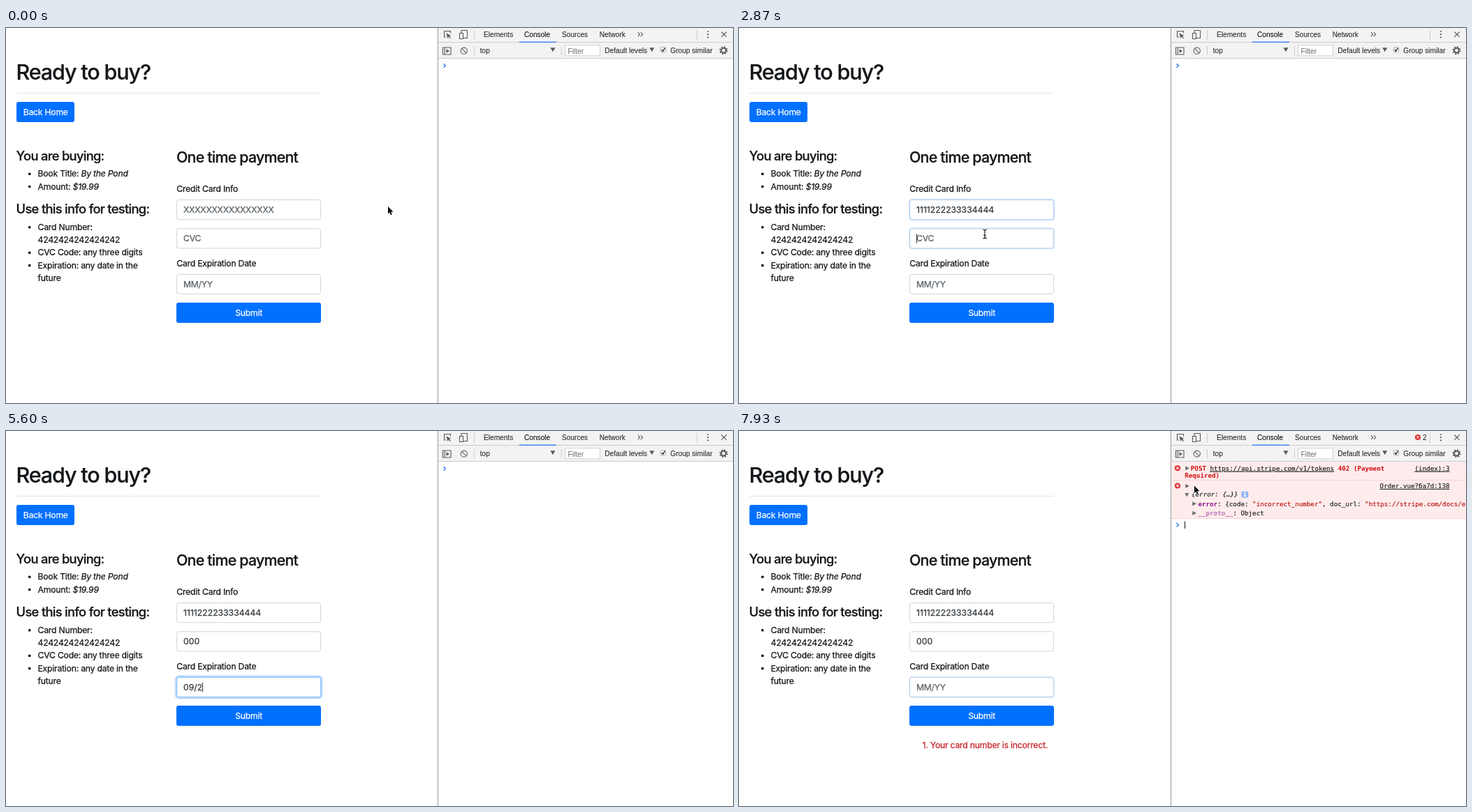
Write an HTML page that moves like this. It is 1041x538 px and loops after 8 s.

```html
<!DOCTYPE html>
<html lang="en">
<head>
<meta charset="utf-8">
<title>Payment form</title>
<style>
  html, body { margin: 0; width: 100%; height: 100%; overflow: hidden; background: #fff; }
  svg { display: block; width: 1041px; height: 538px; }
  text { white-space: pre; stroke-width: .25px; }
  text, tspan { fill: currentColor; stroke: currentColor; }
  .page { font: 12.2px Inter, "Open Sans", sans-serif; letter-spacing: -.0175em; color: #14171a; font-optical-sizing: none; }
  .h1, .h3, .h4 { font-weight: 500; letter-spacing: -.037em; }
  .h1 { font-size: 30.5px; }
  .h3 { font-size: 21.4px; }
  .h4 { font-size: 18.3px; }
  .btn { fill: #0070ff; }
  .white { color: #fff; }
  .mid { text-anchor: middle; }
  .value { color: #30363b; letter-spacing: 0; }
  .hint { color: #5a6268; }
  .alert { color: #c8232b; }
  .tools { font: 10.15px "Liberation Sans", Arial, sans-serif; color: #2c2c2c; }
  .tools text { stroke-width: .1px; }
  .log { font: 9.23px "DejaVu Sans Mono", monospace; color: #1a1a1a; }
  .log text { stroke-width: .15px; }
  .bold { font-weight: bold; stroke: none; }
  .red { color: #d40d12; }
  .link { text-decoration: underline; }
  .key { color: #881391; }
  .proto { color: #a458a8; }
  .str { color: #b9140f; }
  .icon { fill: none; stroke: #5a5a5a; stroke-width: 1.1; }
  .sep { stroke: #ccc; }
  .row { fill: #feecec; }
  .rule { stroke: #fbd3d3; }
</style>
</head>
<body>
<svg viewBox="0 0 1041 538" xmlns="http://www.w3.org/2000/svg">
  <defs>
    <path id="tri" d="M0-3.1L5.6 0L0 3.1z" fill="#6e6e6e"/>
    <path id="down" d="M-3.5-3H3.5L0 3z" fill="#5a5a5a"/>
    <path id="prompt" d="M-1.6-2.8L1.4 0L-1.6 2.8" fill="none" stroke="#367cf1" stroke-width="1.4"/>
    <g id="bad">
      <circle r="4.1" fill="#dc3236"/>
      <path d="M-1.6-1.6L1.6 1.6M1.6-1.6L-1.6 1.6" stroke="#fff" stroke-width="1.1"/>
    </g>
  </defs>

  <g class="page">
    <text class="h1" x="14.5" y="74">Ready to buy?</text>
    <path d="M15 93.6H451" stroke="#e3e3e3"/>
    <rect class="btn" x="15" y="106" width="83" height="29" rx="3"/>
    <text class="white mid" x="56.7" y="125.2">Back Home</text>

    <text class="h4" x="14.6" y="189.6">You are buying:</text>
    <text x="45.5" y="213.3">Book Title: <tspan font-style="italic">By the Pond</tspan></text>
    <text x="45.5" y="231.6">Amount: <tspan font-style="italic">$19.99</tspan></text>
    <text class="h4" x="14.6" y="266">Use this info for testing:</text>
    <text x="45.5" y="289.8">Card Number:</text>
    <text x="45.5" y="308.1">4242424242424242</text>
    <text x="45.5" y="326.4">CVC Code: any three digits</text>
    <text x="45.5" y="344.7">Expiration: any date in the</text>
    <text x="45.5" y="363">future</text>
    <g id="bullets" fill="#14171a"></g>

    <text class="h3" x="244" y="192.8">One time payment</text>
    <text x="244.3" y="235.3">Credit Card Info</text>
    <text x="244.3" y="342.3">Card Expiration Date</text>
    <g id="fields"></g>
    <g id="submit">
      <rect class="btn" x="244" y="394" width="207" height="29" rx="3"/>
      <text class="white mid" x="347.6" y="413.2">Submit</text>
    </g>
    <text id="alert" class="alert" x="262.5" y="455.4">1. Your card number is incorrect.</text>
  </g>

  <g class="tools">
    <rect x="618" width="423" height="538" fill="#fff"/>
    <rect x="618" width="423" height="43" fill="#f3f3f3"/>
    <path class="sep" d="M618 20.5H1041M618 43.5H1041M670.5 3V17M989.5 3V17M670.5 26V39M795.5 26V39"/>
    <path d="M618.5 0V538" stroke="#999"/>
    <path d="M735 20.25H788" stroke="#4285f4" stroke-width="1.5"/>

    <path class="icon" d="M630 13H627.5V4.5H636.5V7.5"/>
    <path d="M630.5 7.5L637.5 11L634.8 11.8L637 14.4L636 15.2L633.8 12.6L632.4 15z" fill="#5a5a5a"/>
    <path class="icon" d="M652 7V3.5H660.5V14.5H655M649.5 7.5H654.5V15.5H649.5z"/>
    <path class="icon" d="M905 6.2L907.6 9.2L905 12.2M909 6.2L911.6 9.2L909 12.2"/>
    <g fill="#5a5a5a"><circle cx="1005" cy="5" r="1.1"/><circle cx="1005" cy="9.2" r="1.1"/><circle cx="1005" cy="13.4" r="1.1"/></g>
    <path class="icon" d="M1024.3 5.5L1031.7 12.9M1031.7 5.5L1024.3 12.9"/>
    <text x="684" y="13">Elements</text>
    <text x="742" y="13" color="#111">Console</text>
    <text x="796" y="13">Sources</text>
    <text x="849.7" y="13">Network</text>

    <path class="icon" d="M625.5 28H637V38H625.5zM628.2 28V38"/>
    <path d="M630.5 30.2L635 33L630.5 35.8z" fill="#5a5a5a"/>
    <path class="icon" d="M652.6 29.4L659 35.8M651.2 32.7a4.6 4.6 0 1 0 9.2 0a4.6 4.6 0 1 0-9.2 0"/>
    <text x="678.7" y="36.2">top</text>
    <use href="#down" x="783" y="31.3"/>
    <rect x="800.5" y="24.8" width="50" height="15" fill="#fff" stroke="#d0d0d0"/>
    <text x="804.5" y="36.7" color="#777">Filter</text>
    <text x="857.3" y="36">Default levels</text>
    <use href="#down" x="924.8" y="31.3"/>
    <rect x="937.3" y="27.6" width="7.4" height="7.4" rx="1.4" fill="#fff" stroke="#a8a8a8" stroke-width=".9"/>
    <path d="M938.8 31.3L940.5 33.3L943.6 28.7" fill="none" stroke="#222" stroke-width="1.4"/>
    <text x="951.3" y="36">Group similar</text>
    <g fill="none" stroke="#5a5a5a" stroke-width="2">
      <circle cx="1027.5" cy="32.2" r="3.4"/>
      <circle cx="1027.5" cy="32.2" r="5" stroke-dasharray="1.9635"/>
    </g>
    <g id="badge"><use href="#bad" x="972" y="9"/><text id="count" x="979" y="13"></text></g>
  </g>

  <g class="log">
    <g id="errors">
      <rect class="row" x="619" y="44" width="422" height="26.5"/>
      <rect id="row" class="row" x="619" y="71" width="422"/>
      <path id="rules" class="rule"/>
      <use href="#bad" x="628" y="53.3"/>
      <use href="#bad" x="628" y="78.5"/>
      <use href="#tri" x="639.3" y="53.4"/>
      <text x="646.8" y="56.8"><tspan class="red bold">POST</tspan> <tspan class="link">https://api.stripe.com/v1/tokens</tspan> <tspan class="red bold">402 (Payment</tspan></text>
      <text class="red bold" x="638.2" y="67.3">Required)</text>
      <text class="link" x="1017.5" y="56.8" text-anchor="end">(index):3</text>
      <text class="link" x="1017.5" y="82" text-anchor="end">Order.vue?6a7d:138</text>
      <g id="shut">
        <use href="#tri" x="639.3" y="80.2"/>
        <use href="#tri" x="647.3" y="80.2"/>
        <text x="656" y="83.4" font-style="italic">{error: {…}}</text>
      </g>
      <g id="open">
        <use href="#tri" x="639.3" y="79"/>
        <path d="M638.2 89H644.4L641.3 94.6z" fill="#6e6e6e"/>
        <text x="648" y="94.4" font-style="italic">{error: {…}}</text>
        <rect x="719.3" y="86.4" width="10" height="9.4" rx="2" fill="#8fb6f3"/>
        <text class="white mid" x="724.3" y="94" font-size="8" font-weight="bold">i</text>
        <use href="#tri" x="649.3" y="104.3"/>
        <text x="657.4" y="107.7"><tspan class="key bold">error</tspan>: {code: <tspan class="str">"incorrect_number"</tspan>, doc_url: <tspan class="str">"https://stripe.com/docs/error-codes"</tspan></text>
        <use href="#tri" x="649.3" y="117.8"/>
        <text x="657.4" y="121.2"><tspan class="proto">__proto__</tspan>: Object</text>
      </g>
    </g>
    <use id="chevron" href="#prompt" x="628"/>
    <path id="typing" d="M638.5 129.5V140" stroke="#111"/>
  </g>

  <path id="arrow" d="M0 0V10.6L2.4 8.4L4 12.2L5.7 11.5L4.1 7.8H7.4z" stroke="#fff" stroke-width="1.4" paint-order="stroke"/>
  <g id="beam" fill="none">
    <path d="M0-5V5" stroke="#fff" stroke-width="2.4" opacity=".6"/>
    <path d="M-2.8-6.2Q0-6.2 0-4.6Q0-6.2 2.8-6.2M0-4.6V4.8M-2.8 6.4Q0 6.4 0 4.8Q0 6.4 2.8 6.4M-1.7 2H1.7" stroke="#111" stroke-width="1.1"/>
  </g>
</svg>

<script>
const LOOP = 8000, STEP = 1000 / 15, FADE = 150;
const $ = id => document.getElementById(id);
const show = (node, on) => node.setAttribute('visibility', on ? 'inherit' : 'hidden');
const set = (node, attrs) => { for (const k in attrs) node.setAttribute(k, attrs[k]); };
const add = (parent, tag, attrs) => {
  const node = document.createElementNS('http://www.w3.org/2000/svg', tag);
  set(node, attrs);
  return parent.appendChild(node);
};
const within = (t, [a, b]) => t >= a && t < b;
const ease = p => { p = Math.min(1, Math.max(0, p)); return p * p * (3 - 2 * p); };
const mix = (a, b, p) => a + (b - a) * p;

// typed: [time, value]; carets: spans in which the caret is lit
const fields = [
  { y: 246.6, hint: 'XXXXXXXXXXXXXXXX', focus: [1250, 2800],
    typed: [[2000, '1111222233334444']], carets: [[1270, 1730], [2000, 2530]] },
  { y: 287.8, hint: 'CVC', focus: [2800, 4450],
    typed: [[3530, '0'], [3800, '00'], [4000, '000']], carets: [[2800, 3330], [3530, 4470]] },
  { y: 353.4, hint: 'MM/YY', focus: [4450, 7850],
    typed: [[4670, '0'], [4870, '09'], [5330, '09/'], [5600, '09/2'], [5730, '09/22'], [6130, '']],
    carets: [[4470, 6670], [7140, 7670]] }
];

// Pointer legs: start and end time, start and end point
const moves = [
  [670, 1130, 547, 256, 373, 263],
  [2340, 2800, 373, 263, 352, 295.5],
  [6870, 7600, 352, 295.5, 663, 68],
  [7600, 7800, 663, 68, 652, 78.5]
];
const hidden = [[2000, 2400], [3530, 6930]];

for (const y of [209.3, 227.6, 285.8, 322.4, 340.7])
  add($('bullets'), 'circle', { cx: 33.7, cy: y, r: 1.9 });

for (const f of fields) {
  const box = { x: 244.6, y: f.y, width: 206, height: 28.2, rx: 3 };
  f.glow = add($('fields'), 'rect', { fill: '#0078ff' });
  f.box = add($('fields'), 'rect', { ...box, fill: '#fff' });
  f.text = add($('fields'), 'text', { x: 254, y: f.y + 18.5 });
  f.caret = add($('fields'), 'path', { stroke: '#333' });
}

function drawField(f, t) {
  const lit = ease((t - f.focus[0]) / FADE) - ease((t - f.focus[1]) / FADE);
  const s = 2.3 * lit;
  set(f.glow, { x: 244.1 - s, y: f.y - .5 - s, width: 207 + 2 * s, height: 29.2 + 2 * s,
    rx: 3.5 + s, opacity: .27 * lit });
  set(f.box, { stroke: `rgb(${mix(206, 128, lit)},${mix(212, 189, lit)},${mix(218, 255, lit)})` });

  let value = '';
  for (const [time, v] of f.typed) if (t >= time) value = v;
  f.text.textContent = value || f.hint;
  f.text.setAttribute('class', value ? 'value' : 'hint');
  const x = 254.5 + (value ? f.text.getComputedTextLength() : 0);
  set(f.caret, { d: `M${x} ${f.y + 7.4}V${f.y + 21}` });
  show(f.caret, f.carets.some(c => within(t, c)));
}

function drawPointer(t) {
  let [, , x, y] = moves[0];
  for (const [a, b, x0, y0, x1, y1] of moves) {
    if (t < a) break;
    const p = ease((t - a) / (b - a));
    x = mix(x0, x1, p);
    y = mix(y0, y1, p);
  }
  const inField = x > 244 && x < 451 && fields.some(f => within(y, [f.y, f.y + 28.2]));
  const seen = !hidden.some(h => within(t, h));
  for (const [id, on] of [['arrow', !inField], ['beam', inField]]) {
    set($(id), { transform: `translate(${x} ${y})` });
    show($(id), seen && on);
  }
}

function draw(t) {
  fields.forEach(f => drawField(f, t));
  set($('submit'), { opacity: within(t, [6000, 6330]) ? .65 : 1 });

  const failed = t >= 6330, opened = t >= 7870;
  const bottom = opened ? 125.5 : 88.5;
  for (const id of ['alert', 'badge', 'errors']) show($(id), failed);
  $('count').textContent = t < 6400 ? 1 : 2;
  set($('row'), { height: bottom - 71 });
  set($('rules'), { d: `M619 70.5H1041M619 ${bottom}H1041` });
  show($('shut'), failed && !opened);
  show($('open'), opened);
  show($('typing'), opened);
  set($('chevron'), { y: !failed ? 54 : bottom + 9.2 });

  drawPointer(t);
}

const start = performance.now();
function tick() {
  const ms = (performance.now() - start) % LOOP;
  // Hold each picture for one step of 15 per second
  draw(Math.floor((ms + 4) / STEP) * STEP + 4);
  requestAnimationFrame(tick);
}
tick();
</script>
</body>
</html>
```
